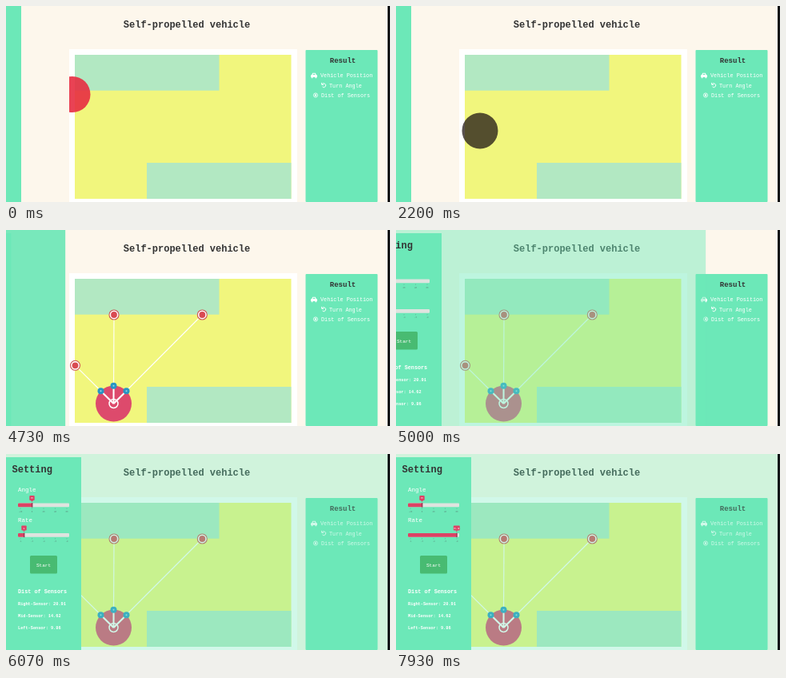
Write an HTML page that moves like this. It is 480 by 245 pixels and loops after 8000 ms.

```html
<!DOCTYPE html>
<html lang="en">
<head>
<meta charset="utf-8">
<title>Self-propelled vehicle</title>
<style>
  html, body { margin: 0; width: 100%; height: 100%; overflow: hidden; background: #fdf7ec; }
  svg { display: block; width: 100%; height: 100%; }
  text { font-family: "Courier New", "Liberation Mono", monospace; white-space: pre; }
  .dark { fill: #333; font-weight: bold; }
  .light { fill: #fff; }
  .bold { font-weight: bold; }
  .mid { text-anchor: middle; }
  .green { fill: #6ce8b8; }
  .mint { fill: #b2e8c2; }
  .red { fill: #dd4265; }
  .tick { font-size: 2.6px; fill: #5b8d7d; text-anchor: middle; }
</style>
</head>
<body>
<svg viewBox="0 0 480 245" preserveAspectRatio="none">
  <defs>
    <clipPath id="boardClip"><path d="M79 54H364V245H79Z"/></clipPath>
    <g id="hit">
      <circle r="6" fill="#fff" stroke="#cf5354" stroke-width="1.1"/>
      <circle r="3.9" fill="#d94a52"/>
    </g>
  </defs>

  <rect width="480" height="245" fill="#fdf7ec"/>
  <text class="dark mid" x="226" y="26.5" font-size="12">Self-propelled vehicle</text>

  <rect x="79" y="54" width="285" height="191" fill="#fff"/>
  <rect x="86" y="61" width="270.5" height="180" fill="#f1f67d"/>
  <rect class="mint" x="86" y="61" width="180.5" height="44.7"/>
  <rect class="mint" x="176" y="196" width="180.5" height="45"/>

  <g clip-path="url(#boardClip)"><circle id="vehicle" r="22.5"/></g>
  <g id="sensors"></g>

  <rect class="green" x="374.5" y="55" width="90" height="190" rx="1"/>
  <text class="dark mid" x="421" y="71" font-size="9">Result</text>
  <g class="light" font-size="6.8">
    <path d="M381 86.5l1.2-.4 1-2.4h3.6l1 2.4 1.2.4v2.6h-.8v1.1h-1.6v-1.1h-3.2v1.1h-1.6v-1.1h-.8z"/>
    <path d="M383.5 86l.5-1.3h2l.5 1.3z" class="green"/>
    <text x="393" y="89">Vehicle Position</text>
    <path d="M395.2 98a2.4 2.4 0 1 1 .4 2.9M394.7 95.8v2.5h2.5" fill="none" stroke="#fff"/>
    <text x="404" y="101.5">Turn Angle</text>
    <circle cx="387" cy="111.5" r="2.6" fill="none" stroke="#fff" stroke-width=".8"/>
    <circle cx="387" cy="111.5" r="1.2"/>
    <text x="394" y="114">Dist of Sensors</text>
  </g>

  <rect id="overlay" class="green" height="245"/>
  <rect x="477" width="3" height="245" fill="#111417"/>

  <g id="panel">
    <rect class="green" y="4" width="94" height="241"/>
    <text class="dark" x="7.5" y="23" font-size="12">Setting</text>
    <text class="light" x="15" y="47" font-size="7.5">Angle</text>
    <text class="light" x="15" y="84.5" font-size="7.5">Rate</text>
    <g id="angle" transform="translate(0 61.5)"></g>
    <g id="rate" transform="translate(0 99)"></g>
    <rect x="30" y="127" width="34" height="22.5" rx="1.5" fill="#48bb72"/>
    <text class="light mid" x="47" y="140.5" font-size="6">Start</text>
    <g class="light bold" font-size="5.25">
      <text x="15" y="174" font-size="6.8">Dist of Sensors</text>
      <text x="15" y="189">Right-Sensor: 20.91</text>
      <text x="15" y="204">Mid-Sensor: 14.62</text>
      <text x="15" y="219">Left-Sensor: 9.86</text>
    </g>
  </g>
</svg>
<script>
const LOOP = 8000;
const DRAG = [1750, 2750], DROP = 3600, OPEN = 4650, SLIDE = [6850, 7650];
const START = { x: 83, y: 110.5 }, PARKED = { x: 134.5, y: 217 };
const $ = id => document.getElementById(id);
const set = (el, attrs) => Object.entries(attrs).forEach(([k, v]) => el.setAttribute(k, v));
const clamp = v => Math.min(1, Math.max(0, v));
const mix = (a, b, p) => a + (b - a) * p;
const smooth = p => p * p * (3 - 2 * p);
const during = (t, [from, to]) => smooth(clamp((t - from) / (to - from)));

// CSS "ease": cubic-bezier(.25, .1, .25, 1)
function ease(x) {
  if (x <= 0 || x >= 1) return clamp(x);
  const bezier = (a, b, s) => 3 * a * s * (1 - s) ** 2 + 3 * b * s * s * (1 - s) + s ** 3;
  let low = 0, high = 1;
  for (let i = 0; i < 24; i++) {
    const s = (low + high) / 2;
    if (bezier(.25, .25, s) < x) low = s; else high = s;
  }
  return bezier(.1, 1, low);
}

function drawSensors() {
  const { x, y } = PARKED;
  const rays = [
    { hit: [86.5, 169.3], eye: [118.5, 201.3] },
    { hit: [135, 106], eye: [134.5, 194.7] },
    { hit: [245.3, 106], eye: [150.5, 201.3] }
  ];
  const line = ([a, b], width) =>
    `<path d="M${x} ${y}L${a} ${b}" stroke="#fff" stroke-width="${width}"/>`;
  $('sensors').innerHTML = rays.map(({ hit, eye }) =>
    line(hit, 1.1) + line(eye, 2) +
    `<use href="#hit" x="${hit[0]}" y="${hit[1]}"/>
     <circle cx="${eye[0]}" cy="${eye[1]}" r="4" fill="#2795c4"/>
     <circle cx="${eye[0]}" cy="${eye[1]}" r="1" fill="#9cd8e8"/>`).join('') +
    `<circle cx="${x}" cy="${y}" r="5.5" fill="none" stroke="#fff" stroke-width="1.5"/>`;
}

function drawSlider(id, x, label, ticks) {
  const half = label.length > 1 ? 4 : 3.2;
  $(id).innerHTML =
    `<rect x="15" width="64" height="4.7" rx="1" fill="#dfe3df"/>
     <rect class="red" x="15" width="${x - 15}" height="4.7" rx="1"/>
     <rect x="${x - .6}" y="-.4" width="1.5" height="5.5" fill="#9c3552"/>
     <rect class="red" x="${x - half}" y="-9.6" width="${half * 2}" height="6.2" rx="1"/>
     <path class="red" d="M${x - 1.5} -3.5h3l-1.5 1.7z"/>
     <text class="light mid" x="${x}" y="-5.2" font-size="4">${label}</text>` +
    ticks.map((tick, i) => {
      const tx = 18 + i * 58 / (ticks.length - 1);
      return `<path d="M${tx} 6v1.4" stroke="#5b8d7d" stroke-width=".4"/>
              <text class="tick" x="${tx}" y="11.3">${tick}</text>`;
    }).join('');
}

function render(t) {
  const drag = during(t, DRAG);
  const dropped = t >= DROP;
  set($('vehicle'), {
    cx: mix(START.x, PARKED.x, drag),
    cy: mix(START.y, PARKED.y, drag),
    fill: dropped ? '#dd4a6c' : t < DRAG[0] ? 'rgba(231,46,66,.9)' : 'rgba(32,22,20,.75)'
  });
  set($('sensors'), { visibility: dropped ? 'visible' : 'hidden' });

  const cover = ease((t - OPEN) / 700);
  set($('overlay'), { width: mix(19, 477, cover), opacity: mix(1, .31, cover) });
  set($('panel'), { transform: `translate(${mix(-94, 0, ease((t - OPEN) / 1000))} 0)` });

  const rate = during(t, SLIDE);
  const value = mix(.1, .9, rate).toFixed(1);
  drawSlider('rate', mix(22.5, 75.8, rate), rate ? value : '1', ['.1', '.2', '.4', '.6', '.9']);
}

drawSensors();
drawSlider('angle', 32.5, '0', ['-20', '0', '20', '40', '60']);
const begin = performance.now();
function tick() {
  render((performance.now() - begin) % LOOP);
  requestAnimationFrame(tick);
}
render(0);
requestAnimationFrame(tick);
</script>
</body>
</html>
```
